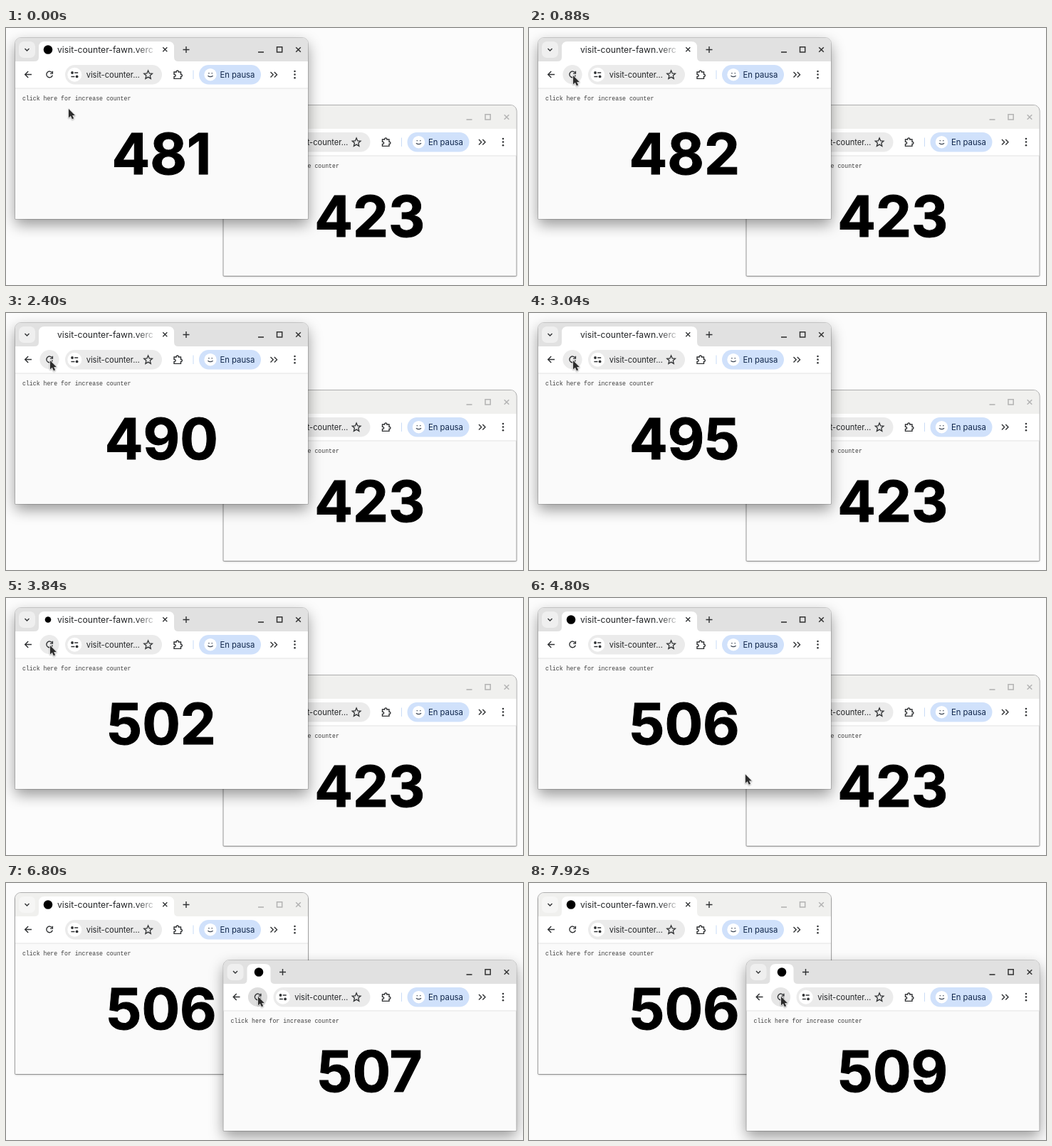
An HTML page with a canvas for the animation above (8000 ms loop, 726x362 px).

```html
<!DOCTYPE html>
<html lang="es">
<head>
<meta charset="utf-8">
<title>Visit counter</title>
<style>
  html, body { margin: 0; width: 100%; height: 100%; overflow: hidden; background: #fcfcfc; }
  canvas { display: block; width: 726px; height: 362px; }
</style>
</head>
<body>
<canvas id="stage" width="726" height="362"></canvas>
<script>
const ctx = document.getElementById('stage').getContext('2d');
const LOOP = 8000, SWAP = 4960;
const UI = 'Inter, "Noto Sans", sans-serif';
const MONO = '"Liberation Mono", monospace';
const INK = '#303234';

// [time, x, y] of the pointer tip
const POINTER = [
  [0, 88, 114], [80, 88, 114], [640, 62, 67], [4400, 62, 67],
  [4720, 286, 246], [5040, 398, 262], [5400, 407, 260],
  [5620, 407, 260], [6000, 354, 160], [LOOP, 354, 160]
];
// [time, count] for the left page
const VISITS = [
  [0, 481], [720, 481], [800, 482], [1680, 486],
  [3040, 495], [3840, 502], [4320, 506], [LOOP, 506]
];

function segment(keys, t) {
  let i = 0;
  while (i < keys.length - 2 && t >= keys[i + 1][0]) i++;
  const a = keys[i], b = keys[i + 1];
  return [a, b, Math.min(1, (t - a[0]) / (b[0] - a[0]))];
}

function pointerAt(t) {
  const [a, b, p] = segment(POINTER, t);
  const e = p * p * (3 - 2 * p);
  return [a[1] + (b[1] - a[1]) * e, a[2] + (b[2] - a[2]) * e];
}

function leftCount(t) {
  const [a, b, p] = segment(VISITS, t);
  return Math.floor(a[1] + (b[1] - a[1]) * p + 1e-6);
}

const rightCount = t => t < 6720 ? 423 : t < 7680 ? 507 : t < 7840 ? 508 : 509;

// Favicon radius; -1 stands for the spinner
function leftIcon(t) {
  if (t < 720 || t >= 4480) return 6.3;
  return [4.3, -1, 0, 0][Math.floor(t / 80) % 4];
}

function rightIcon(t) {
  const busy = (t >= 6640 && t < 6800) || (t >= 7600 && t < 7760) || (t >= 7840 && t < 7920);
  return busy ? 0 : 6.3;
}

function box(x, y, w, h, r, fill) {
  ctx.beginPath();
  ctx.roundRect(x, y, w, h, r);
  ctx.fillStyle = fill;
  ctx.fill();
}

function disc(x, y, r, fill) {
  ctx.beginPath();
  ctx.arc(x, y, r, 0, Math.PI * 2);
  ctx.fillStyle = fill;
  ctx.fill();
}

function line(d, color = INK, width = 1.4) {
  ctx.strokeStyle = color;
  ctx.lineWidth = width;
  ctx.stroke(new Path2D(d));
}

function label(str, x, y, font, fill) {
  ctx.font = font;
  ctx.textAlign = 'left';
  ctx.fillStyle = fill;
  ctx.fillText(str, x, y);
}

// Large digits, slightly heavier than plain bold
function counter(value, x, y) {
  ctx.font = '700 79.5px ' + UI;
  ctx.textAlign = 'center';
  ctx.fillStyle = ctx.strokeStyle = '#000';
  ctx.lineWidth = 1;
  ctx.fillText(value, x, y);
  ctx.strokeText(value, x, y);
}

function frame(h, active) {
  ctx.save();
  ctx.shadowColor = active ? 'rgba(0,0,0,.4)' : 'rgba(0,0,0,.3)';
  ctx.shadowBlur = active ? 20 : 3;
  ctx.shadowOffsetY = active ? 8 : 1;
  box(13, 14, 411, h, [8, 8, 1, 1], '#fafafa');
  ctx.restore();
  ctx.beginPath();
  ctx.roundRect(12.5, 13.5, 412, h + 1, [8.5, 8.5, 1, 1]);
  ctx.strokeStyle = active ? 'rgba(0,0,0,.17)' : 'rgba(0,0,0,.28)';
  ctx.lineWidth = 1;
  ctx.stroke();
}

function tabStrip(win, active) {
  box(13, 14, 411, 33, [8, 8, 0, 0], active ? '#e1e1e1' : '#f0f0ee');
  box(18, 19, 23, 23, 7, active ? '#efefef' : '#f6f6f5');
  line('M26.5 29l3 3 3-3');

  const r = win.tabEnd;
  ctx.fillStyle = '#fff';
  ctx.fill(new Path2D(`M40 47q6 0 6-6V27q0-8 8-8H${r - 8}q8 0 8 8v14q0 6 6 6z`));
  if (win.icon > 0) disc(win.iconX, 30.5, win.icon, '#000');
  if (win.icon < 0) line('M57 25.5l2-.7', '#b4b4b4', 1);

  if (win.title) {
    const fade = ctx.createLinearGradient(183, 0, 214, 0);
    fade.addColorStop(0, '#222426');
    fade.addColorStop(1, 'rgba(34,36,38,0)');
    label(win.title, 72, 34.7, '12.2px ' + UI, fade);
    line('M220.3 27.3l6 6m0-6l-6 6', INK, 1.3);
  }
  const p = r + 17;
  line(`M${p - 4.5} 30.5h9m-4.5-4.5v9`);

  const tone = active ? '#333' : '#b3b3b3';
  line('M354 34h8', tone, 1.6);
  line('M380.5 26.8h7.2v7.2h-7.2z', tone, 1.5);
  line('M407.2 27.2l6.6 6.6m0-6.6l-6.6 6.6', tone, 1.5);
}

function toolbar(hover) {
  ctx.fillStyle = '#fff';
  ctx.fillRect(13, 47, 411, 37.5);
  ctx.fillStyle = '#e6e6e6';
  ctx.fillRect(13, 84.5, 411, 1);

  line('M36 65.5h-9.2m4.4-4.5l-4.5 4.5 4.5 4.5');
  if (hover) disc(61, 65.5, 13.6, hover);
  line('M64.8 63.1a4.3 4.3 0 1 0 .5 3.4');
  line('M65.4 60.8v3.3h-3.4', INK, 1.4);

  box(83, 52, 136, 27.5, 13.7, '#ebebeb');
  disc(96.3, 65.7, 10, '#fff');
  line('M96.2 63h5M91.4 68.4h5', INK, 1.5);
  disc(93, 63, 1.9, INK);
  disc(99.6, 68.4, 1.9, INK);
  label('visit-counter…', 112.7, 69.8, '11.1px ' + UI, '#222426');
  line('M199.6 60l1.7 3.9 4.2.4-3.2 2.8 1 4.2-3.7-2.2-3.7 2.2 1-4.2-3.2-2.8 4.2-.4z', INK, 1.3);

  line('M236 62h3.2c-.6-2.6 3.7-2.6 3.1 0h3.2v3.3c2.5-.5 2.5 3.6 0 3.1v3H236v-2.9c2.8.3 2.8-3.5 0-3.2z', INK, 1.4);
  line('M263 59.5v12.5', '#c9dcf7', 1);

  box(271, 52, 87, 27.5, 13.7, '#d0e1fb');
  disc(287, 65.7, 8.7, '#fff');
  line('M283.4 67.2q3.6 2.8 7.2 0M284 63.8h1.8m2.6 0h1.8', '#3c4554', 1.1);
  label('En pausa', 300.4, 69.8, '11.3px ' + UI, '#10264a');

  line('M371.5 62l3.7 3.7-3.7 3.7m5.3-7.4l3.7 3.7-3.7 3.7');
  for (const y of [61, 65.6, 70.2]) disc(405.5, y, 1.25, INK);
}

function browser(win, active) {
  ctx.save();
  ctx.translate(win.dx, win.dy);
  frame(win.h, active);
  tabStrip(win, active);
  toolbar(win.hover);
  label('click here for increase counter', 23, 101.8, '8.2px ' + MONO, '#3c3c3c');
  counter(win.count, 218.3, win.base);
  ctx.restore();
}

function pointer([x, y]) {
  ctx.save();
  ctx.translate(x, y);
  const arrow = new Path2D('M0 0v12.2l2.9-2.5 2 4.6 2.2-1-2-4.4h3.7z');
  ctx.lineJoin = 'round';
  ctx.shadowColor = 'rgba(0,0,0,.3)';
  ctx.shadowBlur = 2;
  ctx.shadowOffsetY = 1;
  ctx.strokeStyle = '#e4e4e4';
  ctx.lineWidth = 1.6;
  ctx.stroke(arrow);
  ctx.shadowColor = 'transparent';
  ctx.fillStyle = '#2c2c2c';
  ctx.fill(arrow);
  ctx.restore();
}

function draw(t) {
  const tip = pointerAt(t);
  const overReload = Math.hypot(tip[0] - 61, tip[1] - 65.5) < 13.6;
  const left = {
    dx: 0, dy: 0, h: 255, base: 205.8, tabEnd: 236, iconX: 59,
    title: 'visit-counter-fawn.verc', icon: leftIcon(t),
    hover: overReload && '#ebebeb', count: leftCount(t)
  };
  const right = {
    dx: 292.5, dy: 95, h: 240, base: 198.6, tabEnd: 79, iconX: 62.5,
    icon: rightIcon(t), count: rightCount(t),
    hover: t >= 6640 && (t < 7120 ? '#dedede' : '#e6e6e6')
  };
  ctx.fillStyle = '#fcfcfc';
  ctx.fillRect(0, 0, 726, 362);
  const stack = t < SWAP ? [right, left] : [left, right];
  stack.forEach((win, i) => browser(win, i === 1));
  pointer(tip);
}

const start = performance.now();
function tick() {
  draw((performance.now() - start) % LOOP);
  requestAnimationFrame(tick);
}
tick();
</script>
</body>
</html>
```
